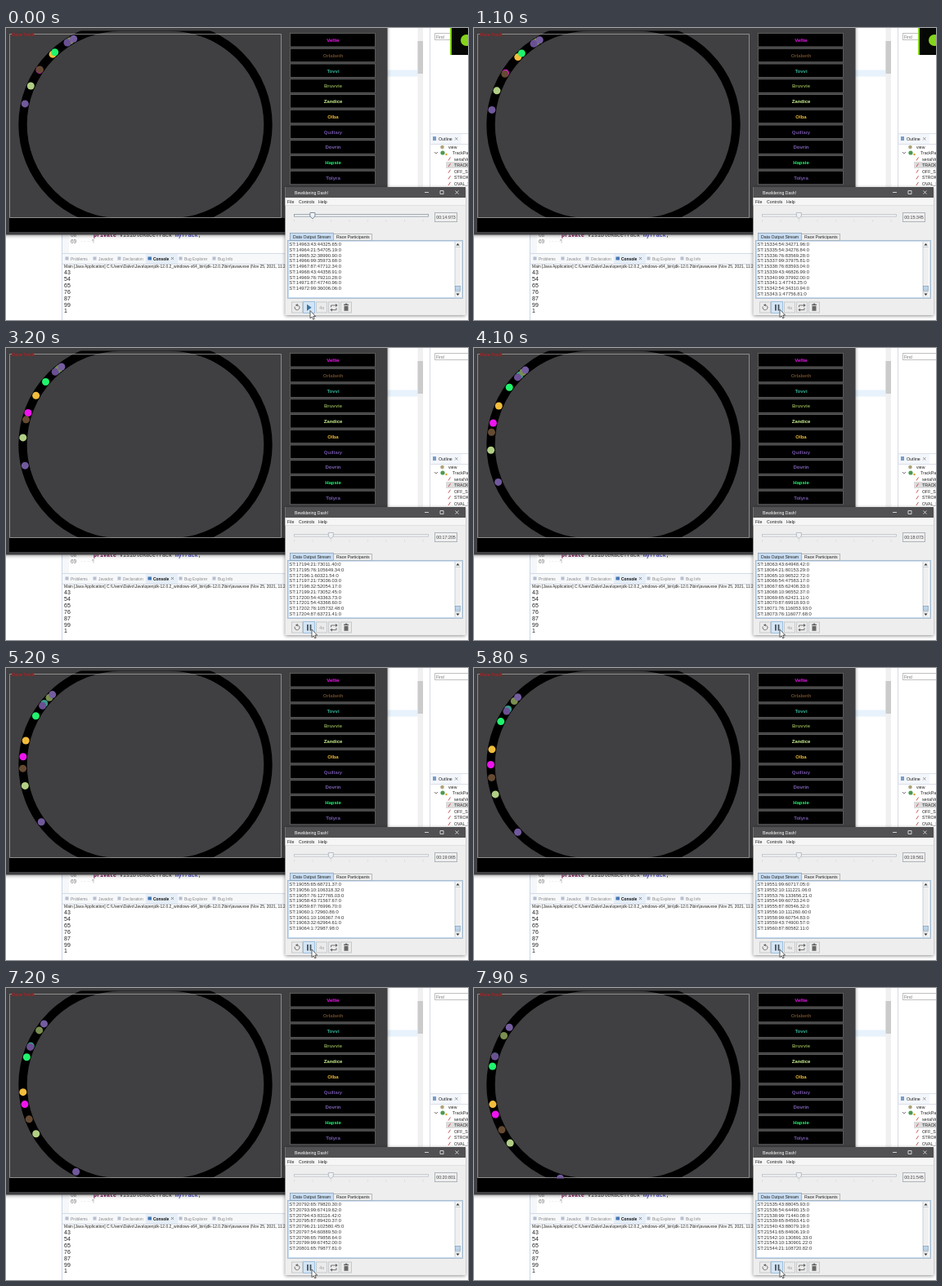
An HTML page that plays this animation: 565x358 px, repeating every 8 s.

```html
<!DOCTYPE html>
<html lang="en">
<head>
<meta charset="utf-8">
<title>Race replay</title>
<style>
html, body { margin: 0; width: 100%; height: 100%; overflow: hidden; background: #fff; }
svg { display: block; width: 565px; height: 358px; }
text { font-family: "Liberation Sans", Arial, sans-serif; white-space: pre; }
.code { font-family: "Liberation Mono", monospace; }
.window { filter: drop-shadow(0 1px 2px rgba(0, 0, 0, .45)); }
</style>
</head>
<body>
<svg id="stage" viewBox="0 0 565 358" xmlns="http://www.w3.org/2000/svg"></svg>
<script>
const LOOP = 8000, FRAME = 100, TICK = 124, START = 14973;
const RESUME = 600, RUN = 800;
const TRACK = { x: 140.5, y: 118.5, r: 120 };

// Wall time to race clock: a last tick, a pause, then steady replay.
const CLOCK = [[0, START], [300, START + TICK], [700, START + TICK],
  [1100, START + 3 * TICK], [7900, START + 53 * TICK], [LOOP, START + 54 * TICK]];

// Angle is in degrees from the leftmost point of the track; speed per second.
const racer = (name, color, angle, speed, gain, textured = true) => ({ name, color, angle, speed, gain, textured });
const RACERS = [
  racer('Vellie', '#ee14ee', -34, 5.9, .3, false),
  racer('Orlabeth', '#6b4a2a', -34.2, 8, .21),
  racer('Tovvi', '#34b39a', -57.2, 1.8, .66),
  racer('Bruvvie', '#85a250', -59, 2.9, .23),
  racer('Zandice', '#cdf593', -23.3, 8, .17),
  racer('Olba', '#f2bd3c', -46, 6, .42, false),
  racer('Quillary', '#7251a6', -56.9, 2.7, .52),
  racer('Dovrin', '#7f62b6', -61.2, 3.6, .04),
  racer('Hapsie', '#20f46d', -47.7, 2.2, .52, false),
  racer('Tolyra', '#7a5db2', -12.3, 9.6, .515)
];

const rect = (x, y, w, h, fill, more = '') =>
  `<rect x="${x}" y="${y}" width="${w}" height="${h}" fill="${fill}" ${more}/>`;
const text = (x, y, size, str, fill = '#222', more = '') =>
  `<text x="${x}" y="${y}" font-size="${size}" fill="${fill}" ${more}>${str}</text>`;
const path = (d, stroke, width = 1, fill = 'none', more = '') =>
  `<path d="${d}" stroke="${stroke}" stroke-width="${width}" fill="${fill}" ${more}/>`;
const shape = (d, fill, more = '') => path(d, 'none', 0, fill, more);
const dot = (x, y, r, fill) => `<circle cx="${x}" cy="${y}" r="${r}" fill="${fill}"/>`;
const frame = (x, y, w, h, fill, stroke) =>
  rect(x + .5, y + .5, w - 1, h - 1, fill, `stroke="${stroke}"`);
const bold = 'font-weight="bold"', middle = 'text-anchor="middle"';

function defs() {
  const patterns = RACERS.map(({ color }, i) =>
    `<pattern id="tex${i}" width="2" height="2" patternUnits="userSpaceOnUse">${rect(0, 0, 2, 2, color)}
      <g opacity=".45">${rect(0, 0, 1, 1, '#504a50')}${rect(1, 1, 1, 1, '#504a50')}</g></pattern>`).join('');
  const clip = (id, ...box) => `<clipPath id="${id}">${rect(...box, '#000')}</clipPath>`;
  return `<defs>${patterns}
    <linearGradient id="metal" x2="0" y2="1"><stop stop-color="#fff"/><stop offset="1" stop-color="#dfe5ea"/></linearGradient>
    ${clip('trackClip', 0, 3.5, 341, 230)}${clip('logClip', 346, 262, 203, 67)}</defs>`;
}

function outlineView() {
  const members = ['serialVe', 'TRACK_', 'OFF_SE', 'STROKE', 'OVAL_S'].map((s, i) => {
    const y = 162.5 + i * 7.6;
    return path(`M541 ${y}l2.5-4`, '#c55', 1) + text(548, y, 5.2, s);
  }).join('');
  return path('M518.5 0V195', '#d5dae4') + frame(524, 6, 44, 9, '#fff', '#c0c0c0') + text(526, 12.6, 5, 'Find', '#777')
    + `<g id="badge">${rect(543, 0, 22, 33, '#84d51b')}${rect(545, 0, 20, 33, '#050805')}${dot(563, 15, 7, '#84d51b')}</g>`
    + path('M518 129.5H565M518 142.5H565', '#dbe0e8') + rect(519, 130, 38, 12, '#f3f7fc')
    + rect(522, 133, 4, 5, '#7a9cc6') + text(529, 138, 5.3, 'Outline')
    + path('M549 134l3.5 3.5M552.5 134l-3.5 3.5', '#888', .8)
    + dot(533.5, 146, 2.3, '#a9a57c') + text(541, 148, 5.2, 'view')
    + path('M524 152l2 2 2-2', '#555', .8) + dot(534, 153, 2.6, '#4c9b50')
    + dot(538.5, 155, 1.2, '#d8a22b') + text(546, 155.3, 5.2, 'TrackPar')
    + rect(538, 164, 27, 8, '#dcdcdc') + members;
}

function consoleView() {
  const tabs = [[79, 'Problems'], [113, 'Javadoc'], [143, 'Declaration'], [218, 'Bug Explorer'], [259, 'Bug Info']];
  return rect(69, 276, 272, 13, '#f6f8fa') + path('M69 276.5H341M69 289.5H341', '#d5dce6')
    + rect(171, 277, 39, 12, '#e6eef8')
    + tabs.map(([x, s]) => rect(x - 6.5, 280.5, 4, 4, '#b5bfd0') + text(x, 284.7, 4.9, s, '#888')).join('')
    + rect(173.5, 280.5, 4.5, 4, '#4778b4') + text(180, 284.7, 4.9, 'Console', '#111', bold)
    + path('M202 281l3 3M205 281l-3 3', '#777', .8)
    + text(71, 293.7, 4.97, 'Main [Java Application] C:\\Users\\Dalvo\\Java\\openjdk-12.0.2_windows-x64_bin\\jdk-12.0.2\\bin\\javaw.exe (Nov 25, 2021, 11:2')
    + [43, 54, 65, 76, 87, 99, 1].map((n, i) => text(71, 302.3 + i * 7.85, 7, n)).join('');
}

function ide() {
  return rect(0, 0, 565, 358, '#fff') + rect(466, 51.5, 38, 8, '#e8f2fc')
    + rect(503.5, 0, 6.5, 195, '#f0f0f0') + rect(503.5, 16, 6.5, 40, '#cbcbcb')
    + outlineView()
    + path('M68.5 253V358', '#c9d7e8') + rect(69, 253, 8, 23, '#f6f7f9')
    + text(79, 256.4, 6.5, '68', '#777') + text(79, 264, 6.5, '69', '#777')
    + text(107, 256.4, 6.67, `<tspan fill="#7f0055" ${bold}>private</tspan> VisibleRaceTrack <tspan fill="#0000c0">myTrack</tspan>;`, '#222', 'class="code"')
    + text(92, 263, 6, '· · · ·¶', '#aaa') + consoleView();
}

function raceWindow() {
  const buttons = RACERS.map(({ name, color }, i) => {
    const y = 6.5 + i * 18.75;
    return rect(347.5, y, 104, 16.5, '#000', 'stroke="#686868" stroke-width=".8"')
      + text(400, y + 10.7, 6, name, color, `${bold} ${middle}`);
  }).join('');
  const dots = RACERS.map(({ color, textured }, i) =>
    `<g class="racer">${dot(0, 0, 4.5, textured ? `url(#tex${i})` : color)}</g>`).join('');
  const { x, y, r } = TRACK;
  return rect(-5, -5, 471.5, 258.5, '#403f41', 'class="window"') + rect(4, 233, 462, 17, '#000')
    + rect(341, 195, 125, 58, '#403f41')
    + `<g clip-path="url(#trackClip)">${rect(x - r, y - r, 300, 2 * r, 'none', `rx="${r}" stroke="#000" stroke-width="10.4"`)}
      ${path('M34 7.5H336.5V232.5H4.5V7.5H7', '#a3a3a3', .8)}${dots}</g>`
    + text(7, 9.6, 5.5, 'Race Track', '#d01818') + buttons;
}

function toolbar() {
  const buttons = [349, 363, 379, 394, 409].map((x, i) => i === 1
    ? frame(x, 335, 15, 15, '#d3e5f5', '#9cc0e0') : frame(x, 335.5, 14, 14, '#ebebeb', '#c6c9cc')).join('');
  const icons = path('M353.3 341a3 3 0 1 0 2.7-1.8', '#666', .9) + shape('M356.6 337.4v3.6l-2.8-1.8z', '#666')
    + shape('M368 338.2v8l5.6-4z', '#3a749f', 'id="play"')
    + shape('M368 338.5h1.8v7.4h-1.8zM371.6 338.5h1.8v7.4h-1.8z', '#4a555e', 'id="pause"')
    + text(386, 344.4, 5.8, '4x', '#999', middle)
    + path('M397.5 341.8v-2.3h6M404 342.6v2.5h-6', '#666', .9) + shape('M403 337.6l2.8 1.9-2.8 1.9zM399 343.2l-2.8 1.9 2.8 1.9z', '#666')
    + shape('M413.5 340.3h5v6h-5zM413 338.2h6v1.2h-6zM414.8 337.3h2.4v1h-2.4z', '#666');
  return buttons + `<g transform="translate(0 .5)">${icons}</g>`;
}

function dialog() {
  const ticks = Array.from({ length: 8 }, (_, i) => `M${352.5 + i * 22.5} 235v2.5`).join('');
  return rect(341.5, 195, 220.5, 157, '#eee', 'class="window"') + rect(341.5, 195, 220.5, 13, '#515153')
    + text(353, 203.8, 5.1, 'Bewildering Dash!', '#fff')
    + path('M512 201.5h5M531 199.5h4v4h-4zM549.5 199.5l4 4M553.5 199.5l-4 4', '#eee', .8)
    + rect(341.5, 208, 220.5, 9.5, '#f6f6f6') + path('M342 217.5H562', '#dadada', .7)
    + text(344, 214.5, 5.2, 'File') + text(358, 214.5, 5.2, 'Controls') + text(382, 214.5, 5.2, 'Help')
    + `<g id="slider">${rect(352.5, 228.5, 164, 2.6, '#f4f7fa', 'stroke="#8b949d" stroke-width=".8"')}
      ${path('M-3 226.5H3V231L0 233.8L-3 231Z', '#6f8296', .9, 'url(#metal)', 'id="thumb"')}</g>`
    + path(ticks, '#d2d2d2', .6)
    + frame(524, 226, 28, 12, '#efefef', '#adb4ba')
    + `<text id="clock" x="538" y="234" font-size="5.3" fill="#444" ${middle}></text>`
    // tabs and stream
    + rect(344.5, 260.5, 214, 71, '#c8ddf2', 'stroke="#a3b4c4" stroke-width=".8"')
    + rect(347.5, 251.5, 53, 9, '#c8ddf2', 'stroke="#8ba1b6" stroke-width=".8"')
    + rect(400.5, 252.5, 47, 8, '#eee', 'stroke="#a9afb5" stroke-width=".8"')
    + text(351, 258, 5.2, 'Data Output Stream') + text(404, 258, 5.2, 'Race Participants')
    + rect(346, 262, 211, 68, '#fff')
    + rect(549, 262, 7, 68, '#f0f0f0') + path('M549 262V330M549 268.5h7M549 323.5h7', '#b7c3ce', .7)
    + rect(549.5, 316.5, 6.2, 5.5, '#bcd4ea', 'stroke="#7f9fbe" stroke-width=".7"')
    + shape('M550.5 266.5h4l-2-2.5zM550.5 325.5h4l-2 2.5z', '#333')
    + '<g id="log" clip-path="url(#logClip)"></g>' + toolbar()
    + path('M0 0V9.5L2.2 7.6L3.7 10.8L5.2 10.1L3.8 7H6.6Z', '#222', .7, '#fff', 'id="cursor"');
}

const stage = document.getElementById('stage');
stage.innerHTML = defs() + ide() + raceWindow() + dialog();
const el = id => document.getElementById(id);
const dots = [...stage.querySelectorAll('.racer')];
el('log').innerHTML = Array.from({ length: 10 }, (_, i) => text(346.3, 267.3 + i * 6.7, 5.85, '', '#333')).join('');
const logLines = [...el('log').children];

function raceClock(t) {
  const i = CLOCK.findIndex(([end]) => end > t);
  const [[t0, c0], [t1, c1]] = [CLOCK[i - 1], CLOCK[i]];
  return c0 + (c1 - c0) * (t - t0) / (t1 - t0);
}

const hash = n => { const v = Math.sin(n * 12.9898) * 43758.5453; return v - Math.floor(v); };

function logLine(k) {
  const time = Math.floor(k * 1.1);
  const n = Math.floor(hash(k) * 10);
  const id = n ? 11 * n - (n < 9) : 1;
  const distance = (4.6 + 8 * hash(n + .5)) * (time - 8300);
  return `ST:${time}:${id}:${distance.toFixed(2)}:0`;
}

function draw(t) {
  const race = raceClock(t), s = (race - START) / 1000;
  const shown = START + TICK * Math.floor((race - START) / TICK + .05);

  RACERS.forEach(({ angle, speed, gain }, i) => {
    const a = (angle + speed * s + gain * s * s) * Math.PI / 180;
    const x = TRACK.x - TRACK.r * Math.cos(a), y = TRACK.y + TRACK.r * Math.sin(a);
    dots[i].setAttribute('transform', `translate(${x.toFixed(2)} ${y.toFixed(2)})`);
  });

  el('clock').textContent = `00:${Math.floor(shown / 1000)}:${String(shown % 1000).padStart(3, '0')}`;
  // The slider snaps to ten-second ticks and is disabled during replay.
  el('thumb').setAttribute('transform', `translate(${352.5 + 22.4 * Math.round(shown / 10000)} 0)`);
  el('slider').style.opacity = t < RUN ? 1 : .5;

  const count = s > 0 && s < 3.6 ? 10 : 9, last = Math.floor(shown / 1.1);
  logLines.forEach((line, i) => { line.textContent = i < count ? logLine(last - count + 1 + i) : ''; });

  const playing = t >= RESUME, shift = Math.min(t / 300, 1) * 2;
  el('play').style.display = playing ? 'none' : '';
  el('pause').style.display = playing ? '' : 'none';
  el('cursor').setAttribute('transform', `translate(${372 + shift} ${346.5 - shift * .7})`);
  el('badge').style.display = t < 3000 ? '' : 'none';
}

const origin = performance.now();
function loop() {
  const t = (performance.now() - origin) % LOOP;
  draw(Math.floor(t / FRAME) * FRAME);
  requestAnimationFrame(loop);
}
loop();
</script>
</body>
</html>
```
